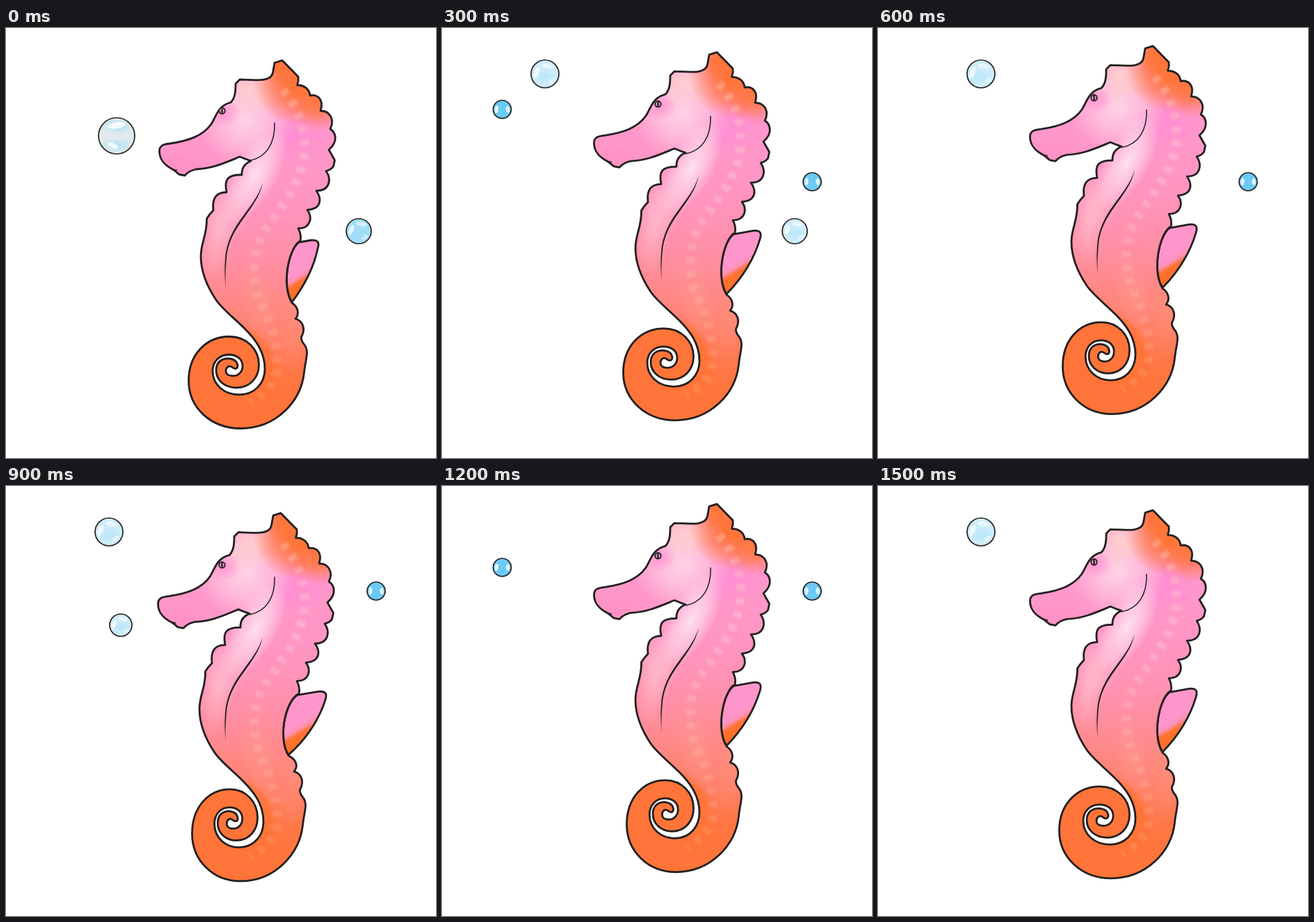
Write an HTML page with a canvas that moves like this. It is 618x618 px and loops after 1800 ms.

```html
<!DOCTYPE html>
<html lang="en">
<head>
<meta charset="utf-8">
<title>Seahorse</title>
<style>
html, body { margin: 0; width: 100%; height: 100%; overflow: hidden; background: #fff; }
canvas { display: block; width: 618px; height: 618px; }
</style>
</head>
<body>
<canvas id="stage" width="618" height="618"></canvas>
<script>
const ctx = document.getElementById('stage').getContext('2d');
const STEP = 300;
const INK = '#231f20';
const ORANGE = '255,116,56';

// Outline pieces, clockwise from the crown.
const CREST = `M386,50 L397,46.500 L420,70 Q421,76 418.500,82 C429,82 436,88 437,97
  C449,95 457,104 452,119 C465,119 473,131 466,145 C474,150 478,163 464,175
  L472.500,190 L470.500,199 Q467,204 460,205.500 C468,217 466,234 446,234
  C454,245 454,260 433,261.500 C441,272 438,288 420,288 Q425,297 423,307`;
const RUMP = `C420,401 422,411 416,418 C427,421 431,433 424.500,444 Q424,449 428,454
  Q433,460 432.500,468 C431.500,478 429.500,485 428.500,495`;
const COIL = `C424,537 388,575.500 337,575.500 C295,575.500 262.500,546 262.500,507
  C262.500,469 288,443.500 321,443.500
  C346,443.500 363.500,462 363.500,484 C363.500,503 350,517 331,517 C314,517 302,506 302,492
  C302,481 309,475 319,475 C328,475 333,480 333,486 C332,491 328,490 325,487.500
  C320,484 316,488 316,493 C316,498 321,500 326,500 C335,500 340,493 340,486
  C340,475 331,469.500 320,469.500 C307,469.500 297,479 297,493 C297,513 314,527 335,527
  C357,527 372,511 372,490`;
const BELLY = `C372,465 358,447 343,432 C328,417 311,404 302,391 C286,367 280,348 280,328
  C280,308 289,298 288.500,274 Q292,268 298,262 C296,246 301,236 317,236
  C313,217 319,210.500 339,211 Q338,197 352,191`;
const FACE = `Q343,188 336,185 C314,194 297,202 273,203 Q263,205 257,212 L249,210.500 L241,204
  C227,197 220.500,189 220.500,177 C220.500,169 226,167 236,166 C263,162 283,155 295,138
  C302,127 305,111 323,107 C330,100 330,88 330,80 L336,74
  C360,75 381,78 383.500,64 Z`;

const SPOTS = new Path2D(`M398,89 C424,118 434,158 427,194 C420,225 402,248 382,277
  C360,304 353,334 359,373 C364,395 377,414 383,436 C388,456 391,478 389,492 C386,515 371,527 351,539`);

// dx, dy: shift of the body; squeeze: tail pulled in; fin: fin spread; bend: fin root
const POSES = {
  low:  { dx: 0,  dy: 0,     squeeze: 0, fin: 0,  bend: 0 },
  mid:  { dx: -2, dy: -11.7, squeeze: 0, fin: 11, bend: 0 },
  high: { dx: -2, dy: -20.7, squeeze: 5, fin: 11, bend: 0 },
  sink: { dx: -2, dy: -7.6,  squeeze: 7, fin: 13, bend: -3 }
};
const BOB = ['low', 'mid', 'high', 'sink', 'high', 'mid'];

// Each bubble: x, y, radius, paleness, steps in which it shows
const BUBBLES = [
  [159, 155, 26, 3, [0]],
  [507, 292, 18, 1, [0]],
  [507, 292, 18, 2, [1]],
  [148, 66, 20, 2, [1, 2, 3, 5]],
  [86.5, 117, 13, 0, [1, 4]],
  [532, 221, 13, 0, [1, 2]],
  [165, 200, 16, 2, [3]],
  [532, 151, 13, 0, [3, 4]]
];
const TONES = ['#6ccaf6', '#a3def8', '#cdecfa', '#e1e9ec'];

function squeezeTail(path, k) {
  return path.replace(/([\d.]+),([\d.]+)/g, (m, x, y) =>
    `${+x + k * Math.max(0, 364 - x) / 102},${y}`);
}

function bodyPath(p) {
  const b = p.bend;
  const root = `L421,307 C${405 + b},320 ${396 + b},372 ${411 + b},395`;
  return new Path2D([CREST, root, RUMP, squeezeTail(COIL, p.squeeze), BELLY, FACE].join(' '));
}

function finPath(p) {
  const t = p.fin, b = p.bend, y = t ? -2 : 0;
  return new Path2D(`M421,308 L${438 + t},${305 + y}
    C${448 + t},${304 + y} ${451 + t},${308 + y} ${448 + t},${317 + y}
    C${442 + t * 0.7},346 ${426 + t * 0.4},374 ${411 + b},394
    C${396 + b},372 ${405 + b},320 421,308 Z`);
}

function glow(x, y, rx, ry, rgb, alpha, core = 0, turn = 0) {
  ctx.save();
  ctx.translate(x, y);
  ctx.rotate(turn);
  ctx.scale(rx, ry);
  const g = ctx.createRadialGradient(0, 0, core, 0, 0, 1);
  g.addColorStop(0, `rgba(${rgb},${alpha})`);
  g.addColorStop(0.5, `rgba(${rgb},${alpha * (core > 0.5 ? 1 : 0.58)})`);
  g.addColorStop(1, `rgba(${rgb},0)`);
  ctx.fillStyle = g;
  ctx.fillRect(-1, -1, 2, 2);
  ctx.restore();
}

function ramp(x0, y0, x1, y1, stops) {
  const g = ctx.createLinearGradient(x0, y0, x1, y1);
  stops.forEach(([t, c]) => g.addColorStop(t, c));
  return g;
}

function line(path, width) {
  ctx.strokeStyle = INK;
  ctx.lineWidth = width;
  ctx.stroke(path);
}

function paintSkin() {
  ctx.fillStyle = ramp(0, 46, 0, 546, [
    [0, '#ffa4cc'], [0.2, '#ff98cc'], [0.37, '#ff95c4'], [0.5, '#ff92b4'],
    [0.61, '#ff8d9c'], [0.71, '#ff8681'], [0.81, '#ff7f66'], [0.91, '#ff7744'], [1, '#ff7438']
  ]);
  ctx.fillRect(200, 20, 300, 580);
  glow(408, 148, 60, 42, '255,134,216', 0.65);
  glow(345, 132, 70, 66, '255,214,230', 0.95);
  glow(350, 88, 44, 36, '255,212,205', 0.8);
  glow(358, 212, 32, 75, '255,224,238', 1, 0, 0.5);
  glow(325, 262, 28, 60, '255,205,222', 0.5, 0, 0.4);
  glow(304, 295, 24, 70, '255,196,204', 0.6, 0, 0.12);
  glow(313, 122, 24, 20, '255,128,205', 0.6);
  glow(245, 196, 46, 20, '255,132,190', 0.35);
  glow(420, 80, 64, 60, ORANGE, 1, 0.22);
  glow(452, 106, 42, 42, ORANGE, 0.85, 0.1);
  glow(398, 54, 26, 32, ORANGE, 0.9, 0.3);
  glow(365, 398, 28, 65, '255,160,145', 0.4, 0, -0.3);
  glow(412, 420, 22, 75, '255,150,125', 0.45);
  glow(314, 500, 80, 80, ORANGE, 1, 0.7);

  ctx.save();
  ctx.filter = 'blur(1.8px)';
  ctx.strokeStyle = ramp(0, 90, 0, 540, [
    [0, 'rgba(255,190,170,.42)'], [0.25, 'rgba(255,205,220,.42)'],
    [0.6, 'rgba(255,190,185,.34)'], [1, 'rgba(255,175,130,.24)']
  ]);
  ctx.lineWidth = 13;
  ctx.setLineDash([9, 10.7]);
  ctx.stroke(SPOTS);
  ctx.restore();
}

function paintDetails() {
  line(new Path2D('M386,136 C387,166 374,186 350,190.500'), 1.5);
  // Tapered fold
  ctx.fillStyle = INK;
  ctx.fill(new Path2D(`M369,222 C361,263 320,283 316.700,333 Q314.700,355 315.700,374
    Q313.500,350 314.900,333 C318,281 358,261 369,222 Z`));
  ctx.beginPath();
  ctx.arc(310.5, 119, 4.3, 0, Math.PI * 2);
  ctx.fillStyle = '#d99abb';
  ctx.fill();
  ctx.strokeStyle = INK;
  ctx.lineWidth = 1.8;
  ctx.stroke();
  ctx.fillStyle = '#111';
  ctx.fillRect(309.5, 115.5, 2, 7);
}

function drawSeahorse(p) {
  const body = bodyPath(p), fin = finPath(p);
  ctx.save();
  ctx.translate(p.dx, p.dy);
  ctx.fillStyle = ramp(415, 354, 425, 371, [[0, '#ff96cb'], [0.35, '#ff90b0'], [0.65, '#ff7438'], [1, '#ff7028']]);
  ctx.fill(fin);
  line(fin, 2.8);

  // The skin shading moves a little less than the outline.
  const ix = p.dx ? 2 : 0;
  ctx.save();
  ctx.clip(body);
  ctx.translate(ix, ix);
  paintSkin();
  ctx.restore();

  line(body, 2.8);
  line(new Path2D('M240,203.500 L246,204.500'), 1.6);
  ctx.translate(ix, ix);
  paintDetails();
  ctx.restore();
}

function oval(x, y, rx, ry, turn, color) {
  ctx.beginPath();
  ctx.ellipse(x, y, rx, ry, turn, 0, Math.PI * 2);
  ctx.fillStyle = color;
  ctx.fill();
}

function drawBubble(x, y, r, pale) {
  ctx.save();
  ctx.translate(x, y);
  ctx.beginPath();
  ctx.arc(0, 0, r, 0, Math.PI * 2);
  ctx.fillStyle = TONES[pale];
  ctx.fill();
  ctx.save();
  ctx.clip();
  if (pale === 3) {
    glow(0, -r * 0.55, r, r * 0.42, '170,228,250', 0.9);
    glow(0, r * 0.52, r, r * 0.38, '170,228,250', 0.8);
    oval(0, -r * 0.58, r * 0.5, r * 0.17, -0.15, 'rgba(255,255,255,.85)');
    oval(-r * 0.2, r * 0.55, r * 0.3, r * 0.14, 0.4, 'rgba(255,255,255,.8)');
  } else if (pale === 0) {
    oval(-r * 0.62, 0, r * 0.2, r * 0.4, 0.1, 'rgba(255,255,255,.8)');
    oval(r * 0.62, 0, r * 0.2, r * 0.36, -0.1, 'rgba(255,255,255,.8)');
  } else {
    glow(0, r * 0.2, r * 0.9, r * 0.5, '140,220,248', 0.3);
    oval(r * 0.2, -r * 0.56, r * 0.45, r * 0.18, 0.2, 'rgba(255,255,255,.55)');
    oval(-r * 0.6, -r * 0.1, r * 0.18, r * 0.42, 0.35, 'rgba(255,255,255,.7)');
    oval(r * 0.5, r * 0.48, r * 0.28, r * 0.14, -0.7, 'rgba(255,255,255,.45)');
  }
  ctx.restore();
  ctx.beginPath();
  ctx.arc(0, 0, r, 0, Math.PI * 2);
  ctx.strokeStyle = INK;
  ctx.lineWidth = 1.7;
  ctx.stroke();
  ctx.restore();
}

function draw(step) {
  ctx.fillStyle = '#fff';
  ctx.fillRect(0, 0, 618, 618);
  ctx.lineJoin = ctx.lineCap = 'round';
  BUBBLES.forEach(([x, y, r, pale, steps]) => {
    if (steps.includes(step)) drawBubble(x, y, r, pale);
  });
  ctx.lineCap = 'butt';
  drawSeahorse(POSES[BOB[step]]);
}

const start = performance.now();
let shown = -1;
function tick() {
  const step = Math.floor((performance.now() - start) / STEP) % BOB.length;
  if (step !== shown) draw(shown = step);
  requestAnimationFrame(tick);
}
tick();
</script>
</body>
</html>
```
